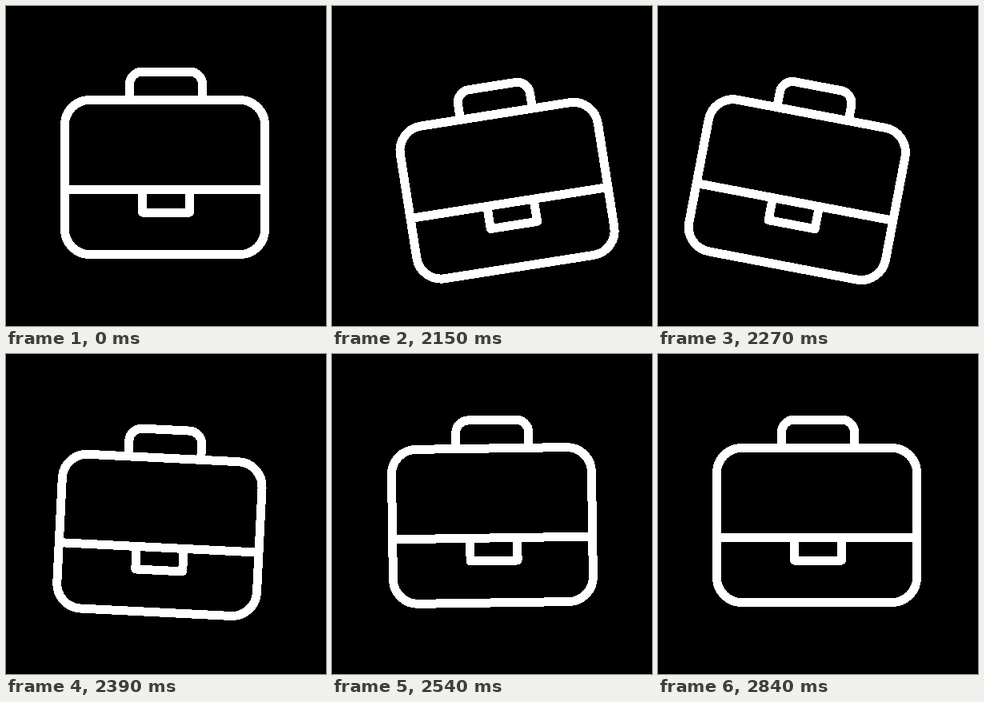
Write an HTML page that moves like this. It is 400 by 400 pixels and loops after 2.87 s.

```html
<!DOCTYPE html>
<html lang="en">
<head>
<meta charset="utf-8">
<title>Swinging briefcase</title>
<style>
  html, body { margin: 0; width: 100%; height: 100%; overflow: hidden; background: #000; }
  svg { display: block; width: 100vw; height: 100vh; }
  #case { fill: none; stroke: #fff; stroke-width: 11; stroke-linejoin: round; shape-rendering: crispEdges; }
</style>
</head>
<body>
<svg viewBox="0 0 400 400">
  <g id="case">
    <path d="M154.5 117.5V98a16 16 0 0 1 16-16h59a16 16 0 0 1 16 16v19.5"/>
    <rect x="73.5" y="117.5" width="250" height="193" rx="31"/>
    <path d="M73.5 229.5h250M170.5 229.5V258h59v-28.5"/>
  </g>
</svg>
<script>
  const LOOP = 2870, REST = 2000, START = 2030, STEP = 30;
  const PIVOT = '200 82';

  // Turning points of the swing: ms after rest, degrees
  const turns = [[0, 0], [140, -9.2], [285, 11.3], [475, -3.2], [615, 2.1], [725, -0.8], [840, 0]];
  const DEPTH = 19, LOWEST = 210, LANDED = 545;

  const quarterSine = u => Math.sin(Math.PI / 2 * u);

  // Half a cosine wave from each turning point to the next
  function angle(s) {
    const i = turns.findIndex(([time]) => s <= time);
    const [t0, a0] = turns[i - 1], [t1, a1] = turns[i];
    return a0 + (a1 - a0) * (1 - Math.cos(Math.PI * (s - t0) / (t1 - t0))) / 2;
  }

  // Quick fall, then a return that speeds up
  function drop(s) {
    if (s < LOWEST) return DEPTH * quarterSine((s / LOWEST) ** 0.65);
    return DEPTH * quarterSine(Math.max(0, (LANDED - s) / (LANDED - LOWEST)));
  }

  const bag = document.getElementById('case');

  function draw(t) {
    if (t < START) return bag.removeAttribute('transform');
    const s = START + Math.floor((t - START) / STEP) * STEP - REST;
    bag.setAttribute('transform', `translate(0 ${drop(s)}) rotate(${angle(s)} ${PIVOT})`);
  }

  let began;
  function tick(now) {
    began ??= now;
    draw((now - began) % LOOP);
    requestAnimationFrame(tick);
  }
  requestAnimationFrame(tick);
</script>
</body>
</html>
```
